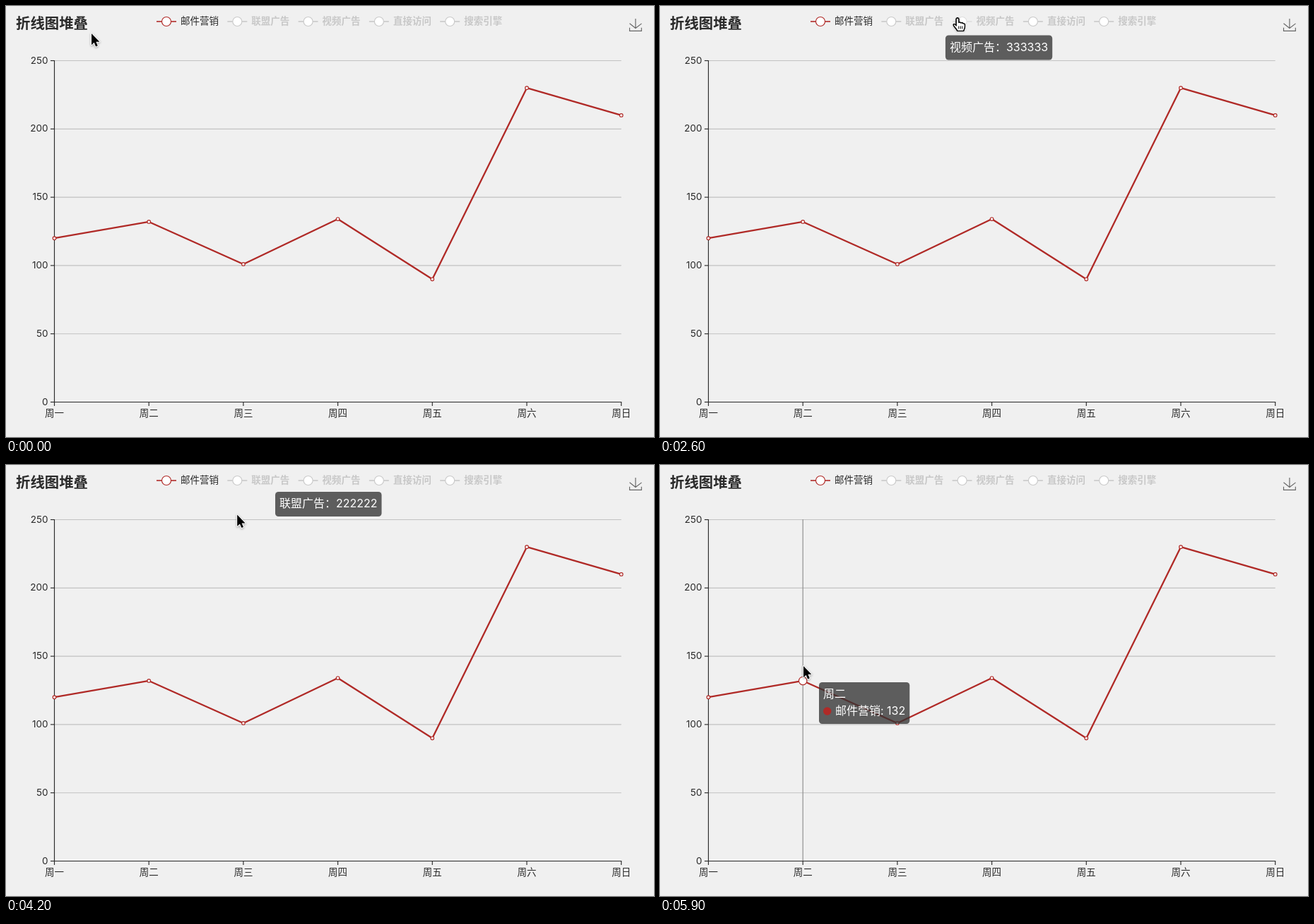
Write an HTML page with a canvas that moves like this. It is 917 px wide and 611 px high and loops after 6 s.

```html
<!DOCTYPE html>
<html lang="zh-CN">
<head>
<meta charset="utf-8">
<style>
html, body { margin: 0; height: 100%; overflow: hidden; background: #f0f0f0; }
canvas { display: block; }
</style>
</head>
<body>
<canvas id="stage" width="917" height="611"></canvas>
<script>
const ctx = document.getElementById('stage').getContext('2d');
const FONT = 'Inter, "Noto Sans CJK SC", "Noto Sans CJK", sans-serif';
const RED = '#b02a27', DARK = '#2a2a2a', THIN = 1.15;
const LOOP = 6000, STEP = 100;

const days = [...'一二三四五六日'].map(d => '周' + d);
const values = [120, 132, 101, 134, 90, 230, 210];
const series = ['邮件营销', '联盟广告', '视频广告', '直接访问', '搜索引擎'];
const totals = ['11111', '222222', '333333', '444444', '555555'];
const px = i => 68.5 + i * 133.7;
const py = v => 561.5 - v * 1.936;

// Pointer path: time, x, y
const pointerKeys = [
  [500, 121, 39], [1000, 216, 28], [1300, 245, 22], [1800, 245, 22], [1900, 335, 22],
  [2300, 350, 19], [2600, 421, 17], [2800, 428, 17], [3000, 528, 17], [3200, 528, 17],
  [3500, 358, 17], [4150, 358, 17], [4400, 204, 285], [5900, 203, 285]
];
// Tooltip targets: start time, x, y, series index (-1 for the axis tooltip)
const tipKeys = [
  [1000, 237, 50, 0], [1300, 267, 44, 0], [2000, 356, 44, 1], [2300, 372, 41, 1],
  [2500, 414, 41.6, 2], [2600, 443, 40, 2], [3000, 550, 39, 3], [3300, 450, 39, 2],
  [3500, 381, 38, 1], [4400, 232, 309, -1], [4500, 225, 308, -1]
];

const arrow = new Path2D('M0 0V16.2L3.7 12.8L6.1 18.5L8.8 17.3L6.4 11.8H11.4Z');
const hand = new Path2D('M-1.8 11V1.6Q-1.8 0 0 0Q1.8 0 1.8 1.6V6.5Q3.6 5.4 4.8 7Q6.8 6.2 7.8 7.9' +
  'Q10.4 7.6 10.4 10V12.5Q10 15 8.6 18.3H0Q-2 15 -4.6 12Q-6.6 9.5 -5 8.7Q-3.6 8.3 -1.8 11Z');
const fingers = new Path2D('M1.8 11.5V15.5M4.3 11.5V15.5M6.8 11.5V15.5');
const download = new Path2D('M882.5 24.7L890.9 31.4L899.5 24.9M882.5 30.8V35.3H899.3V30.8M890.9 31.2V18');

function text(str, x, y, size, color, align = 'left', weight = 400) {
  ctx.font = `${weight} ${size}px ${FONT}`;
  ctx.textAlign = align;
  ctx.textBaseline = 'middle';
  ctx.fillStyle = color;
  ctx.fillText(str, x, y);
}

function line(points, color, width = THIN) {
  ctx.beginPath();
  points.forEach(p => ctx.lineTo(...p));
  ctx.strokeStyle = color;
  ctx.lineWidth = width;
  ctx.stroke();
}

function circle(x, y, r, fill, stroke) {
  ctx.beginPath();
  ctx.arc(x, y, r, 0, 7);
  ctx.fillStyle = fill;
  ctx.fill();
  if (!stroke) return;
  ctx.strokeStyle = stroke;
  ctx.lineWidth = THIN;
  ctx.stroke();
}

function pointerAt(t) {
  const next = pointerKeys.findIndex(k => k[0] > t);
  if (next === 0) return pointerKeys[0].slice(1);
  if (next < 0) return pointerKeys.at(-1).slice(1);
  const [t0, x0, y0] = pointerKeys[next - 1], [t1, x1, y1] = pointerKeys[next];
  const u = (t - t0) / (t1 - t0);
  return [x0 + (x1 - x0) * u, y0 + (y1 - y0) * u];
}

function legendAt(x, y) {
  const offset = x - 213;
  return y < 31 && offset >= 0 && offset % 100.3 < 89 ? Math.floor(offset / 100.3) : -1;
}

function drawAxes() {
  for (let v = 0; v <= 250; v += 50) {
    const y = py(v);
    if (v) line([[68.5, y], [870.7, y]], '#c2c2c2');
    line([[63, y], [68.5, y]], DARK);
    text(v, 59.5, y, 13.5, DARK, 'right');
  }
  line([[68.5, 77], [68.5, 562]], DARK);
  line([[68, 561.5], [871.2, 561.5]], DARK);
  days.forEach((day, i) => {
    line([[px(i), 561.5], [px(i), 567]], DARK);
    text(day, px(i), 577.5, 13.5, DARK, 'center');
  });
}

function drawLegend(hovered) {
  series.forEach((name, i) => {
    const x = 213 + i * 100.3;
    const color = i === 0 ? RED : i === hovered ? '#dedede' : '#cacaca';
    line([[x, 22], [x + 28, 22]], color, 1.6);
    circle(x + 14, 22, 6.5, '#fff', color);
    text(name, x + 34, 22, 13.5, i ? '#c8c8c8' : DARK, 'left', i ? 700 : 400);
  });
}

function drawSeries(t) {
  const onAxis = t >= 4400, highlighted = t >= 1100 && t < 2000;
  if (onAxis) line([[px(1), 77], [px(1), 561]], '#8c8c8c');
  ctx.lineJoin = 'bevel';
  line(values.map((v, i) => [px(i), py(v)]), RED, 2.3);
  ctx.lineJoin = 'miter';
  values.forEach((v, i) => {
    const big = highlighted || (onAxis && i === 1);
    circle(px(i), py(v), big ? 5.7 : 2.3, '#fff', RED);
  });
}

function drawTooltip(t) {
  if (t < tipKeys[0][0]) return;
  let x = 410, y = 441, index = 0;
  tipKeys.forEach(([start, tx, ty, content], i) => {
    if (t < start) return;
    const end = Math.min(t, tipKeys[i + 1]?.[0] ?? LOOP);
    const ease = 1 - (1 - Math.min(1, (end - start) / 400)) ** 5;
    x += (tx - x) * ease;
    y += (ty - y) * ease;
    index = content;
  });
  const axis = index < 0;
  const label = axis ? `${series[0]}: ${values[1]}` : `${series[index]}：${totals[index]}`;
  ctx.font = `400 16px ${FONT}`;
  const width = ctx.measureText(label).width + (axis ? 29 : 12);
  ctx.beginPath();
  ctx.roundRect(x, y, width, axis ? 59 : 35, 4.5);
  ctx.fillStyle = 'rgba(50,50,50,.77)';
  ctx.fill();
  if (axis) {
    text(days[1], x + 6, y + 17.5, 16, '#fff');
    circle(x + 11.7, y + 41, 5.7, RED);
    text(label, x + 23, y + 41, 16, '#fff');
  } else {
    text(label, x + 6, y + 17.5, 16, '#fff');
  }
}

function drawPointer(x, y, overLegend) {
  ctx.save();
  ctx.translate(x, y);
  ctx.lineJoin = 'round';
  ctx.shadowColor = 'rgba(0,0,0,.35)';
  ctx.shadowBlur = 3;
  ctx.shadowOffsetY = 1;
  ctx.lineWidth = overLegend ? 1.3 : 2;
  ctx.strokeStyle = overLegend ? '#000' : '#fff';
  ctx.fillStyle = overLegend ? '#fff' : '#000';
  const shape = overLegend ? hand : arrow;
  ctx.stroke(shape);
  ctx.shadowColor = 'transparent';
  ctx.fill(shape);
  if (overLegend) {
    ctx.stroke(shape);
    ctx.lineWidth = 1;
    ctx.stroke(fingers);
  }
  ctx.restore();
}

function render(now) {
  const t = Math.floor(now % LOOP / STEP) * STEP;
  const [x, y] = pointerAt(t);
  const hovered = legendAt(x, y);
  ctx.fillStyle = '#f0f0f0';
  ctx.fillRect(0, 0, 917, 611);
  text('折线图堆叠', 14, 25.5, 20.4, DARK, 'left', 700);
  ctx.strokeStyle = '#666';
  ctx.lineWidth = THIN;
  ctx.stroke(download);
  drawAxes();
  drawLegend(hovered);
  drawSeries(t);
  drawTooltip(t);
  drawPointer(x, y, hovered >= 0);
}

const begin = performance.now();
function tick() {
  render(performance.now() - begin);
  requestAnimationFrame(tick);
}
tick();
</script>
</body>
</html>
```
